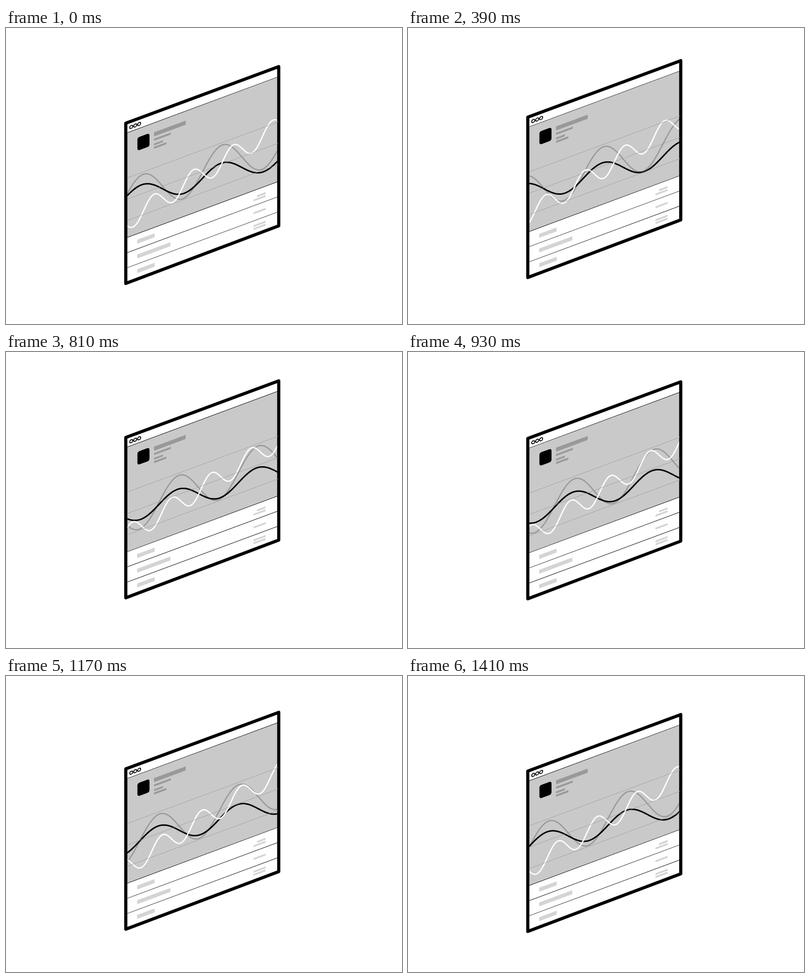
An HTML page with a canvas for the animation above (1440 ms loop, 800x600 px).

```html
<!DOCTYPE html>
<html lang="en">
<head>
<meta charset="utf-8">
<title>Floating chart window</title>
<style>
  html, body { margin: 0; width: 100%; height: 100%; overflow: hidden; background: #fff; }
  canvas { display: block; width: 800px; height: 600px; }
</style>
</head>
<body>
<canvas id="stage" width="800" height="600"></canvas>
<script>
const ctx = document.getElementById('stage').getContext('2d');
const LOOP = 1440, STEP = 30, LIFT = 20, WAVE_CYCLE = 1475;
const SLOPE = 0.372, LEFT = 242, RIGHT = 551;
const INNER_LEFT = LEFT + 3.2, INNER_RIGHT = RIGHT - 3.2;
const CHART_TOP = 213.4, CHART_BOTTOM = 425.7, ROW = 30.7, ROWS = 3;

// Cubic Bezier ease (0.6, 0, 0.4, 1), solved by bisection
function ease(p) {
  let lo = 0, hi = 1;
  for (let i = 0; i < 24; i++) {
    const t = (lo + hi) / 2, u = 1 - t;
    if (1.8 * t * u * u + 1.2 * t * t * u + t * t * t < p) lo = t; else hi = t;
  }
  return lo * lo * (3 - 2 * lo);
}

function bar(x, middle, width, height, color) {
  ctx.fillStyle = color;
  ctx.fillRect(x, middle - height / 2, width, height);
}

function rule(y, color, width, end = INNER_RIGHT) {
  ctx.strokeStyle = color;
  ctx.lineWidth = width;
  ctx.beginPath();
  ctx.moveTo(INNER_LEFT, y);
  ctx.lineTo(end, y);
  ctx.stroke();
}

// A sine that climbs along its own slope and travels left one period per cycle
function wave(time, { color, width, middle, slope, amp, period, crest }) {
  const shift = period * time / WAVE_CYCLE;
  ctx.strokeStyle = color;
  ctx.lineWidth = width;
  ctx.beginPath();
  for (let x = INNER_LEFT - 3; x <= INNER_RIGHT + 3; x++) {
    const angle = 2 * Math.PI * (x - crest + shift) / period;
    ctx.lineTo(x, middle - slope * (x - LEFT) - amp * Math.cos(angle));
  }
  ctx.stroke();
}

function drawWaves(time) {
  ctx.save();
  ctx.beginPath();
  ctx.rect(INNER_LEFT, 0, INNER_RIGHT - INNER_LEFT, 600);
  ctx.clip();
  ctx.lineJoin = 'round';
  wave(time, { color: '#999', width: 2.5, middle: 349.3, slope: SLOPE, amp: 39.6, period: 160, crest: 437 });
  wave(time, { color: '#000', width: 3, middle: 346.8, slope: 0.272, amp: 20.4, period: 160, crest: 437 });
  wave(time, { color: '#fff', width: 2.6, middle: 392.6, slope: 0.625, amp: 20, period: 80, crest: 378 });
  ctx.restore();
}

function drawHeading() {
  ctx.fillStyle = '#000';
  ctx.beginPath();
  ctx.roundRect(265.5, 230.9, 24.4, 26.8, 4.5);
  ctx.fill();

  bar(299, 236.9, 64, 8.2, '#999');
  bar(299, 247.8, 34, 4, '#999');
  bar(299, 257.3, 18, 3.7, '#999');
  bar(299, 264.1, 25, 4, '#999');

  ctx.strokeStyle = '#000';
  ctx.lineWidth = 1.7;
  for (let i = 0; i < 3; i++) {
    ctx.beginPath();
    ctx.arc(253 + 8 * i, 204.6, 3, 0, 2 * Math.PI);
    ctx.stroke();
  }
}

// Outer rows hold a short label and a pair of values, the middle row a long label and one value.
function drawRows() {
  const end = 524.5, color = '#d4d4d4';
  for (let i = 0; i < ROWS; i++) {
    const single = i === 1, value = 442.6 + 29 * i;
    bar(265, 441.9 + 29.8 * i, single ? 67 : 35.3, 8, color);
    if (single) {
      bar(end - 24.5, value, 24.5, 3.8, color);
    } else {
      const first = i ? 24.5 : 17.5;
      bar(end - first, value - 3, first, 3.8, color);
      bar(end - 24.5, value + 3, 24.5, 3.8, color);
    }
  }
}

function drawFrame() {
  ctx.strokeStyle = '#000';
  ctx.lineWidth = 6.4;
  ctx.lineJoin = 'round';
  ctx.beginPath();
  ctx.moveTo(LEFT, 192.9);
  ctx.lineTo(RIGHT, 78.2);
  ctx.lineTo(RIGHT, 401);
  ctx.lineTo(LEFT, 517.8);
  ctx.closePath();
  ctx.stroke();
}

function draw(time) {
  const half = LOOP / 2;
  const dy = -LIFT * ease(1 - Math.abs(time - half) / half);
  const flat = () => ctx.setTransform(1, 0, 0, 1, 0, dy);
  const sheared = () => ctx.setTransform(1, -SLOPE, 0, 1, 0, dy + SLOPE * LEFT);

  ctx.resetTransform();
  ctx.clearRect(0, 0, 800, 600);

  sheared();
  ctx.fillStyle = '#c9c9c9';
  ctx.fillRect(LEFT, CHART_TOP, RIGHT - LEFT, CHART_BOTTOM - CHART_TOP);
  drawHeading();
  drawRows();

  flat();
  drawWaves(time);

  sheared();
  rule(CHART_TOP, '#000', 0.9);
  for (let i = 0; i < ROWS; i++) rule(CHART_BOTTOM + ROW * i, '#000', 0.9);

  flat();
  drawFrame();

  sheared();
  for (let i = 0; i < 3; i++) rule(304.8 + 43.3 * i, '#999', 0.7, 550);
}

function tick() {
  const time = performance.now() % LOOP;
  draw(Math.floor(time / STEP) * STEP);
  requestAnimationFrame(tick);
}
tick();
</script>
</body>
</html>
```
